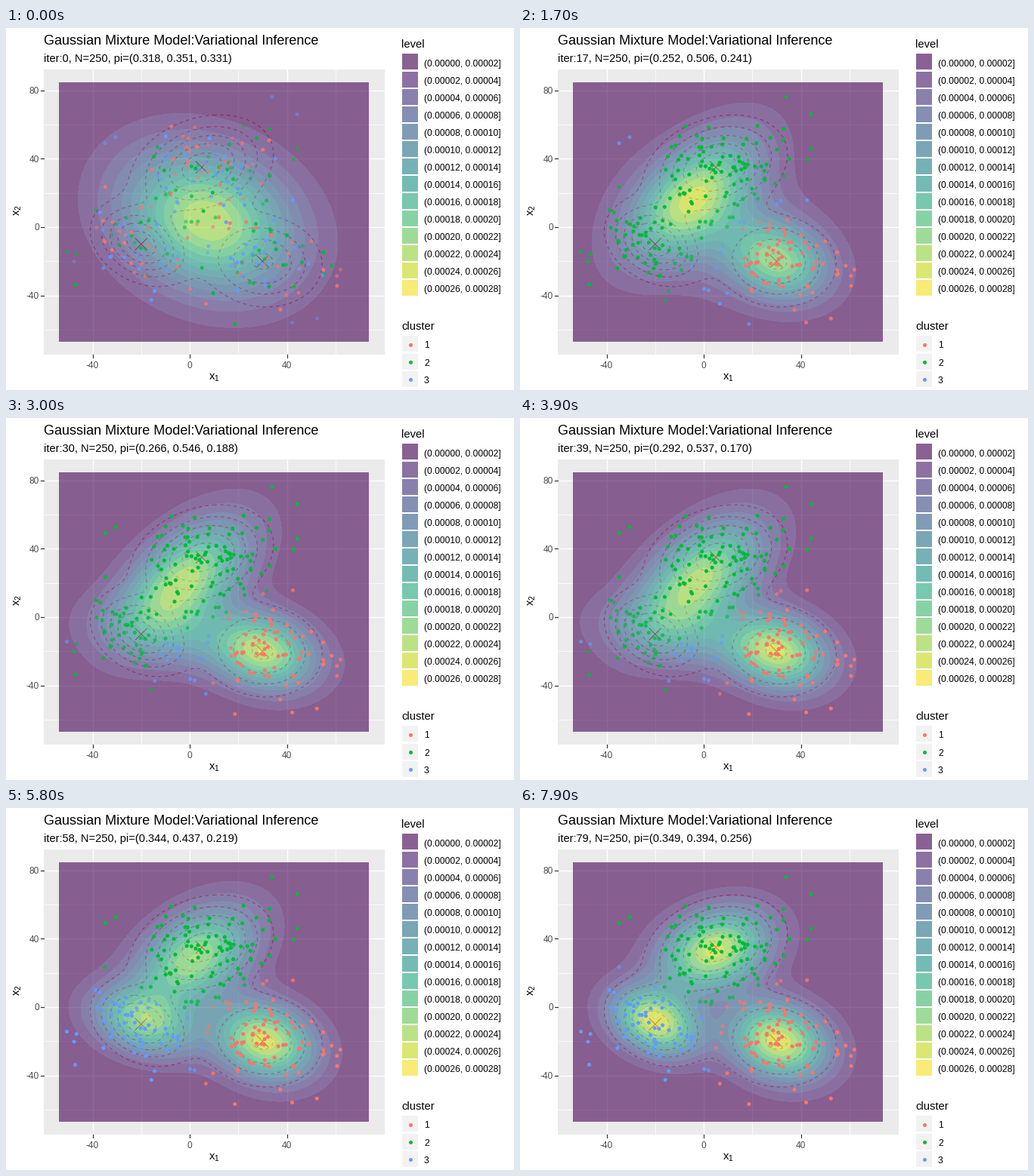
A matplotlib script that plays this animation: 672x480 px, repeating every 8000 ms.

```python
import numpy as np
import matplotlib.pyplot as plt
from matplotlib.animation import FuncAnimation
from matplotlib.patches import Rectangle

plt.rcParams.update({
    "font.family": "Liberation Sans",
    "mathtext.fontset": "custom",
    "mathtext.rm": "Liberation Sans",
    "lines.dashed_pattern": [4, 4],
})

W, H, FRAMES, N = 672, 480, 80, 250
PT = 0.72  # points per pixel at 100 dpi
STEP = 2e-5
COLORS = np.array([[248, 118, 109], [0, 186, 56], [97, 156, 255]]) / 255
VIRIDIS = plt.get_cmap("viridis")(np.linspace(0, 1, 14))
VIRIDIS[:, 3] = 0.6


def model(*rows):
    """Rows of weight, mean x, y, variance x, y, covariance."""
    r = np.array(rows)
    cov = r[:, [3, 5, 5, 4]].reshape(-1, 2, 2)
    return r[:, 0], r[:, 1:3], cov


# right, top and left cluster: true model and the drawn sample
TRUTH = model((.30, 30, -20, 210, 250, -15),
              (.45, 5, 35, 250, 270, 65),
              (.25, -20, -10, 125, 175, -45))
SAMPLE = model((.35, 31, -20, 208, 258, -45),
               (.39, 4.7, 33.5, 250, 275, 60),
               (.26, -20, -8.7, 150, 190, -45))

ITERS = [0, 11, 17, 30, 48, 58, 79]
PI = np.array([(.318, .351, .331), (.302, .392, .305), (.252, .506, .241),
               (.266, .546, .188), (.319, .528, .152), (.344, .437, .219),
               (.349, .394, .256)])


def ease(x):
    x = min(max(x, 0), 1)
    return x * x * (3 - 2 * x)


def px(x):
    return 243 + 3.2125 * np.asarray(x)


def py(y):
    return 264 - 2.267 * np.asarray(y)


def parts(mix, x, y):
    """Weighted density of every cluster at x, y."""
    out = []
    for w, (mx, my), ((vx, c), (_, vy)) in zip(*mix):
        dx, dy, det = x - mx, y - my, vx * vy - c * c
        q = (vy * dx**2 - 2 * c * dx * dy + vx * dy**2) / det
        out.append(w * np.exp(-q / 2) / (2 * np.pi * np.sqrt(det)))
    return np.array(out)


def fitted(i):
    """Fitted mixture: each cluster takes a share of the three real groups."""
    pi = np.array([np.interp(i, ITERS, col) for col in PI.T])
    size, mean, cov = SAMPLE

    # the second cluster first covers top and left evenly, then mostly top
    even = pi[1] * size[1] / (size[1] + size[2])
    top_first = min(pi[1], size[1])
    top = even + (top_first - even) * ease((i - 11) / 20)
    share = np.zeros((3, 3))
    share[0, 0] = pi[0]
    share[1, 1:] = top, pi[1] - top
    share[2] = size - share[:2].sum(0)

    # start from clusters that all cover everything
    split = ease(i / 15)
    share = split * share + (1 - split) * np.outer(pi, size)

    share /= share.sum(1, keepdims=True)
    mu = share @ mean
    second = cov + np.einsum("ki,kj->kij", mean, mean)
    var = np.einsum("gk,kij->gij", share, second) - np.einsum("gi,gj->gij", mu, mu)
    return pi, mu, 0.96 * var


rng = np.random.default_rng(4)
points = np.vstack([
    m + np.clip(rng.normal(size=(round(N * w), 2)), -2.5, 2.5) @ np.linalg.cholesky(c).T
    for w, m, c in zip(*SAMPLE)])
points = rng.permutation(points)
first_label = rng.integers(0, 3, len(points))
first_alpha = rng.uniform(0.4, 1, len(points))

# one density value for each pixel of the filled area
LEFT, RIGHT, TOP, BOTTOM = 70, 480, 72, 416
gx, gy = np.meshgrid((np.arange(LEFT, RIGHT) + 0.5 - 243) / 3.2125,
                     (264 - np.arange(TOP, BOTTOM) - 0.5) / 2.267)


def heat(mix):
    level = (parts(mix, gx, gy).sum(0) / STEP).astype(int)
    return VIRIDIS[np.minimum(level, 13)]


fig = plt.figure(figsize=(W / 100, H / 100), dpi=100, facecolor="white")
ax = fig.add_axes([0, 0, 1, 1])
ax.set(xlim=(0, W), ylim=(H, 0))
ax.axis("off")


def text(x, y, s, size, color="black", **kw):
    return ax.text(x, y, s, fontsize=size * PT, color=color, **kw)


def rect(x, y, w, h, color, **kw):
    ax.add_patch(Rectangle((x, y), w, h, fc=color, ec="none", antialiased=False, **kw))


def grid_lines(xs, ys, lw):
    ax.vlines(px(xs), 55, 433, colors="white", lw=lw * PT, zorder=1)
    ax.hlines(py(ys), 50, 501, colors="white", lw=lw * PT, zorder=1)


# panel and axes
rect(50, 55, 451, 378, "#EBEBEB", zorder=0)
grid_lines([-20, 20, 60], [-60, -20, 20, 60], 0.71)
grid_lines([-40, 0, 40], [-40, 0, 40, 80], 1.42)
for v in (-40, 0, 40):
    ax.plot([px(v)] * 2, [433, 436.7], color="#333333", lw=1.2 * PT)
    text(px(v), 451, f"{v}", 11.9, "#4D4D4D", ha="center")
for v in (-40, 0, 40, 80):
    ax.plot([46.3, 50], [py(v)] * 2, color="#333333", lw=1.2 * PT)
    text(44, py(v) + 4.5, f"{v}", 11.9, "#4D4D4D", ha="right")
text(275.5, 464, r"$\mathrm{x_1}$", 14.7, ha="center", va="center")
text(15.5, 242, r"$\mathrm{x_2}$", 14.7, ha="center", va="center", rotation=90)
text(50, 22, "Gaussian Mixture Model:Variational Inference", 17.95)
subtitle = text(50, 45, "", 14.6)

# true model, below the fitted density
ax.contour(px(gx), py(gy), parts(TRUTH, gx, gy).sum(0), levels=np.arange(1, 6) * 5e-5,
           colors="red", alpha=0.6, linestyles="dashed", linewidths=1.1 * PT, zorder=2)
for cx, cy in zip(px(TRUTH[1][:, 0]), py(TRUTH[1][:, 1])):
    for s in (-7.6, 7.6):
        ax.plot([cx - 7.6, cx + 7.6], [cy - s, cy + s], color="red", lw=PT, zorder=2)


# legends
def key(y, color="#F2F2F2"):
    top = round(y - 11.5)
    rect(524, top, 21, 21, "#F2F2F2", zorder=2)
    rect(524, top, 21, 21, color, zorder=3)


text(523, 25.5, "level", 14.7)
for k in range(14):
    yc = 46 + 23.04 * k
    key(yc, VIRIDIS[k])
    text(553, yc + 4.5, f"({k * STEP:.5f}, {(k + 1) * STEP:.5f}]", 12.05)
text(523, 400, "cluster", 14.7)
for k in range(3):
    yc = 420 + 23.04 * k
    key(yc)
    ax.scatter(535, yc - 0.5, s=13, color=COLORS[k], linewidths=0, zorder=4)
    text(553, yc + 4.5, str(k + 1), 12.2)

fill = ax.imshow(heat(fitted(0)), extent=(LEFT, RIGHT, BOTTOM, TOP), aspect="auto",
                 interpolation="nearest", zorder=3)
ax.set(xlim=(0, W), ylim=(H, 0))
dots = ax.scatter(px(points[:, 0]), py(points[:, 1]), s=13.5, linewidths=0, zorder=4)


def update(i):
    mix = fitted(i)
    fill.set_data(heat(mix))

    if i == 0:
        label, alpha = first_label, first_alpha
    else:
        resp = parts(mix, *points.T)
        resp /= resp.sum(0)
        label = resp.argmax(0)
        alpha = np.clip(0.45 + resp.max(0) - 0.33, 0, 1)
    dots.set_facecolors(np.column_stack([COLORS[label], alpha]))

    weights = ", ".join(f"{w:.3f}" for w in mix[0])
    subtitle.set_text(f"iter:{i}, N={N}, pi=({weights})")
    return fill, dots, subtitle


anim = FuncAnimation(fig, update, frames=FRAMES, interval=100, repeat=True,
                     repeat_delay=0, blit=False)
plt.show()
```
